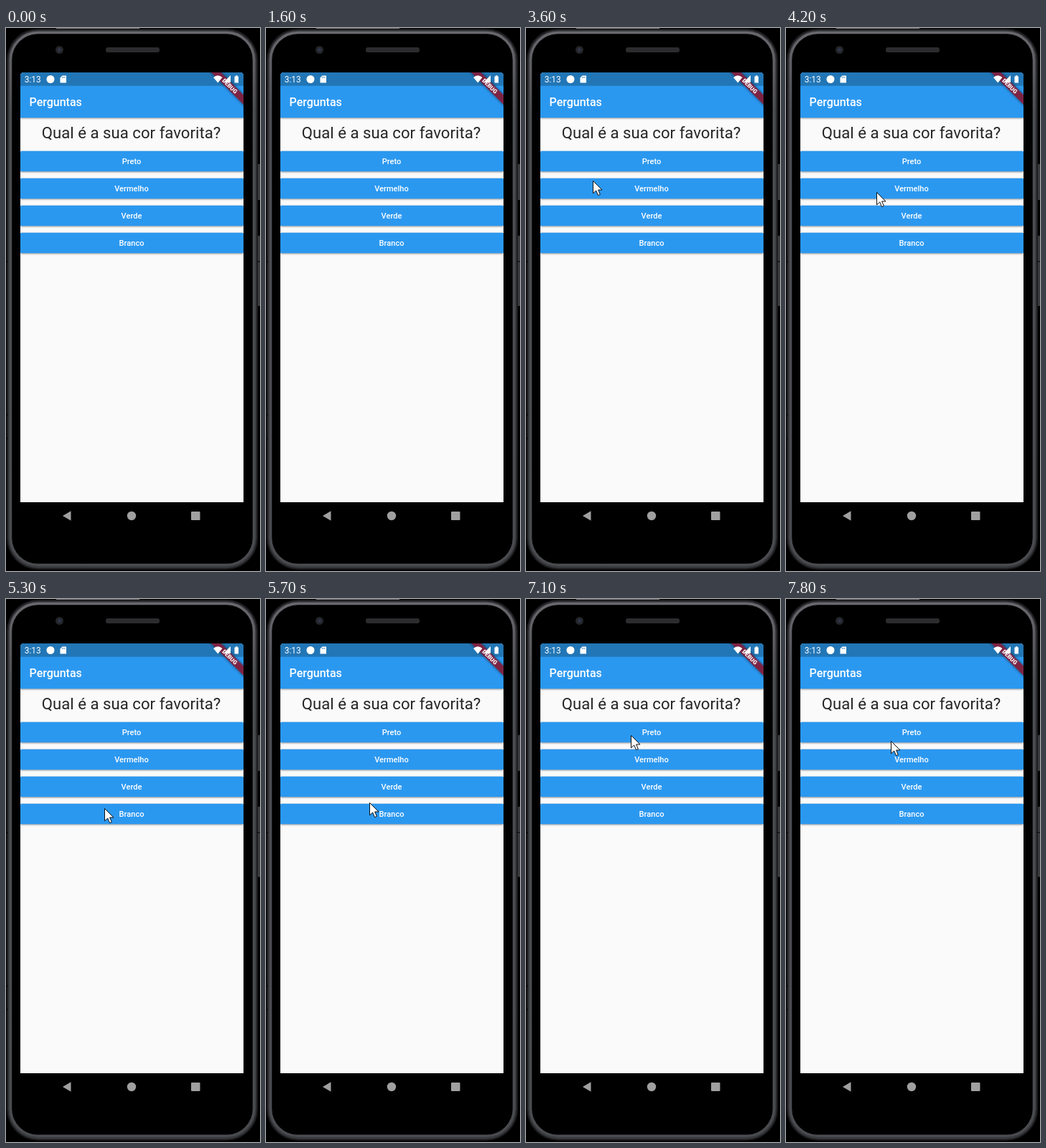
Animation of 354x758 px, one loop 8000 ms. Source, as an HTML page:

```html
<!DOCTYPE html>
<html lang="pt">
<head>
<meta charset="utf-8">
<style>
  html, body { margin: 0; width: 100%; height: 100%; overflow: hidden; background: #000; }
  svg { display: block; font-family: Roboto, sans-serif; }
  .button { filter: drop-shadow(0 1.2px 1px #0006); }
</style>
</head>
<body>
<svg width="354" height="758" viewBox="0 0 354 758">
  <defs>
    <linearGradient id="rim" x2="0" y2="1">
      <stop offset="0" stop-color="#68686d"/>
      <stop offset=".15" stop-color="#4c4d51"/>
      <stop offset="1" stop-color="#4a4b4f"/>
    </linearGradient>
    <clipPath id="screen"><path d="M20 67Q20 62 25 62H326Q331 62 331 67V662H20Z"/></clipPath>
  </defs>

  <!-- phone body -->
  <path d="M350 190h4v50h-4zM350 290h4v98h-4z" fill="#38393b"/>
  <path d="M70 .5H186" stroke="#77777b"/>
  <rect x="1" y="1" width="350" height="755" rx="44" fill="#1d1d20"/>
  <rect x="3" y="3" width="346" height="751" rx="42" fill="#38393c"/>
  <rect x="6.500" y="6.500" width="339" height="743" rx="38" fill="#000" stroke="url(#rim)" stroke-width="3.500"/>
  <path d="M0 326h3M0 540h3M0 573h3M350 326h4" stroke="#000"/>
  <circle cx="74.500" cy="30.500" r="5.500" fill="#242528"/>
  <circle cx="74.500" cy="30.500" r="2.500" fill="#30344a"/>
  <rect x="139" y="27" width="75" height="7" rx="3" fill="#2c2c2e"/>

  <!-- app -->
  <g clip-path="url(#screen)">
    <path d="M20 62H331V662H20Z" fill="#fafafa"/>
    <path class="button" d="M20 62H331V125.300H20Z" fill="#2b98f0"/>
    <path d="M20 62H331V80.700H20Z" fill="#2276b6"/>
    <text x="32.500" y="109" font-size="16" font-weight="500" fill="#fff">Perguntas</text>
    <text x="174.500" y="153.600" font-size="22.200" text-anchor="middle" fill="#262626">Qual é a sua cor favorita?</text>
    <g id="answers" font-size="11.090" font-weight="500" text-anchor="middle"></g>
    <g transform="translate(331 62) rotate(45)">
      <path d="M-40 22.200H40V31.700H-40Z" fill="#7d2343" style="filter:drop-shadow(0 0 2px #0008)"/>
      <text y="29.800" font-size="8.080" font-weight="900" text-anchor="middle" fill="#fff">DEBUG</text>
    </g>
  </g>

  <!-- status bar -->
  <g fill="#fff">
    <text x="25.800" y="76" font-size="11.900">3:13</text>
    <circle cx="62" cy="71.500" r="5.500"/>
    <path d="M78.500 66.500H84V76.500H75.500V69.500Z"/>
    <path d="M289 69Q295.300 63.500 301.500 69L295.300 76.500Z"/>
    <path d="M313 66V76H303Z"/>
    <path d="M318.500 67.500H320V66.300H322.500V67.500H324V76.500H318.500Z"/>
  </g>
  <path d="M78.500 68v2M80.200 68v2M81.900 68v2" stroke="#2276b6" stroke-width=".7"/>

  <!-- navigation -->
  <g fill="#a0a0a0">
    <path d="M79 681L90.500 674.300V687.700Z"/>
    <circle cx="175" cy="681" r="6.200"/>
    <rect x="258" y="675" width="12.500" height="12" rx="1"/>
  </g>

  <path id="cursor" d="M.5 .5V17.800L4.700 14L7.500 20.600L10.400 19.400L7.600 13H13Z"
        fill="#fff" stroke="#111" stroke-linejoin="round"/>
</svg>
<script>
  const LOOP = 8000, STEP = 100;
  const cursor = document.getElementById('cursor');

  document.getElementById('answers').innerHTML =
    ['Preto', 'Vermelho', 'Verde', 'Branco'].map((label, i) => `
      <rect class="button" x="20" y="${171.8 + 38 * i}" width="311" height="28.500" rx="1.500" fill="#2b98f0"/>
      <text x="175" y="${190.1 + 38 * i}" fill="#fff">${label}</text>`).join('');

  // time, x, y of the pointer tip
  const path = [
    [3300, 0, 300], [3600, 93, 213], [3800, 110, 200], [4100, 114, 191],
    [4200, 126, 229], [5000, 126, 229], [5300, 137, 292], [5600, 142, 300],
    [5900, 147, 251], [6300, 146, 195], [6400, 146, 195], [6500, 146, 193],
    [6900, 146, 193], [7300, 146, 186], [7500, 146, 186], [7800, 146, 198], [LOOP, 146, 198]
  ];

  function pointerAt(t) {
    const next = path.findIndex(key => key[0] > t);
    const [t0, x0, y0] = path[next - 1], [t1, x1, y1] = path[next];
    const k = (t - t0) / (t1 - t0);
    return [x0 + (x1 - x0) * k, y0 + (y1 - y0) * k].map(Math.round);
  }

  function draw() {
    const t = Math.floor(performance.now() % LOOP / STEP) * STEP;
    const visible = t >= path[0][0];
    cursor.setAttribute('visibility', visible ? 'visible' : 'hidden');
    if (visible) cursor.setAttribute('transform', `translate(${pointerAt(t)})`);
    requestAnimationFrame(draw);
  }
  draw();
</script>
</body>
</html>
```
